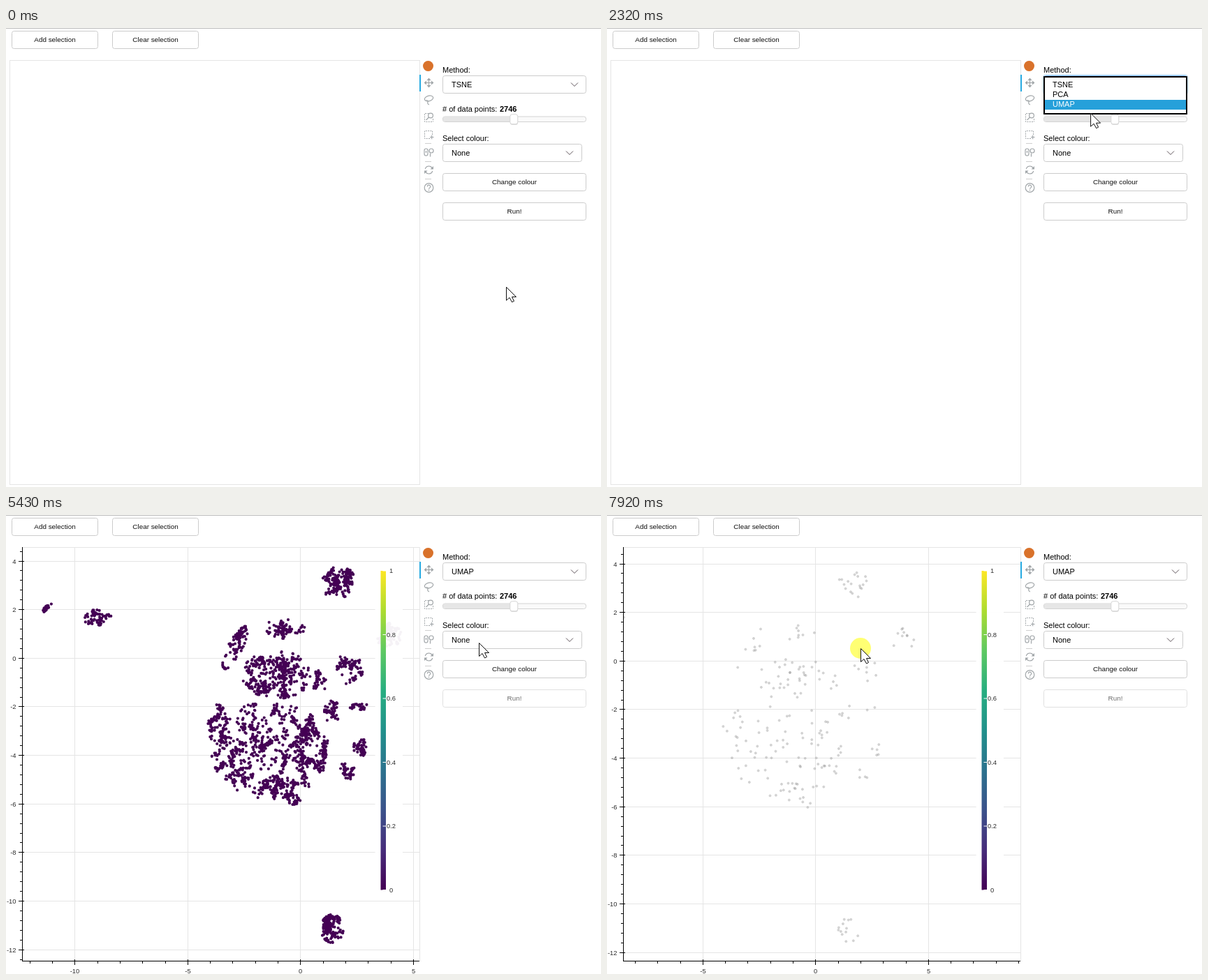
An HTML page for the animation above (8 s loop, 852 px wide and 658 px high).

```html
<!DOCTYPE html>
<html lang="en">
<head>
<meta charset="utf-8">
<title>Embedding explorer</title>
<style>
  html, body { margin: 0; width: 100%; height: 100%; overflow: hidden; background: #fff; }
  svg { display: block; width: 852px; height: 658px; font: 11px Arial, "Liberation Sans", sans-serif; fill: #000; }
  .btn rect, .box { fill: #fff; stroke: #ccc; }
  .btn text { font-size: 9.9px; text-anchor: middle; fill: #111; }
  .btn.hover rect { fill: #f5f5f5; stroke: #b8b8b8; }
  .btn.off { opacity: .6; }
  .chev { fill: none; stroke: #4a3e46; stroke-width: .9; }
  .caret { fill: #dcdcdc; }
  .icon { fill: none; stroke: #a1a6a9; stroke-width: 1.2; }
  .icon .solid { fill: #a1a6a9; stroke: none; }
  .icon .dash { stroke-dasharray: 2 1.3; stroke-width: 1; }
  .sep { stroke: #cfcfcf; }
  .grid { stroke: #e5e5e5; fill: none; }
  .axis { stroke: #000; fill: none; }
  .tick text, .scale text { font-size: 9.4px; fill: #2b2b2b; }
  .lod circle { fill: #808080; stroke: #808080; opacity: .35; }
</style>
</head>
<body>
<svg viewBox="0 0 852 658">
  <defs>
    <clipPath id="frame"><rect x="23" y="46" width="569" height="593"/></clipPath>
    <clipPath id="xBand"><rect x="23" y="636" width="570" height="22"/></clipPath>
    <clipPath id="yBand"><rect x="0" y="46" width="27" height="593"/></clipPath>
    <clipPath id="listClip"><rect x="627" y="71" width="202" height="34"/></clipPath>
    <linearGradient id="viridis" x1="0" y1="1" x2="0" y2="0"></linearGradient>
  </defs>

  <path d="M0 .5H852" stroke="#bdbdbd"/>
  <rect id="blank" class="grid" x="5.5" y="46.5" width="587" height="608"/>

  <g id="plot">
    <g clip-path="url(#frame)">
      <g id="pan">
        <path id="grid" class="grid"/>
        <path id="dots" stroke="#440154" stroke-width="4.2" stroke-linecap="round"/>
        <g id="lod" class="lod"></g>
      </g>
    </g>
    <path class="grid" d="M23 46.5H592.5V639"/>
    <path class="axis" d="M23.5 46V639.5M23 639.5H592"/>
    <g clip-path="url(#xBand)"><g id="xTicks" class="tick" text-anchor="middle"></g></g>
    <g clip-path="url(#yBand)"><g id="yTicks" class="tick" text-anchor="end"></g></g>
    <g id="scale" class="scale" text-anchor="middle">
      <rect x="528.5" y="71.5" width="39.5" height="475" fill="#fff" opacity=".95"/>
      <rect x="536.5" y="80" width="7.5" height="457.5" fill="url(#viridis)"/>
    </g>
  </g>

  <circle cx="604.5" cy="54.5" r="7.5" fill="#d9722b"/>
  <rect x="592" y="67" width="2" height="24" fill="#26aae1"/>
  <g class="icon">
    <path d="M600 78.5H611M605.5 73V84"/>
    <path class="solid" d="M605.5 71.5l3 3.5h-6zM605.5 85.5l3-3.5h-6zM598.5 78.5l3.5-3v6zM612.5 78.5l-3.5-3v6z"/>
    <ellipse cx="605.5" cy="101" rx="6.3" ry="3.8" transform="rotate(-15 605.5 101)"/>
    <path d="M601 104q4-1 3 2t2 4"/>
    <path class="dash" d="M610 134.5H599.5V122.5H605M611.5 130V134.5"/>
    <circle cx="608" cy="125.5" r="3.4"/>
    <path d="M605.5 128l-4 4"/>
    <path class="dash" d="M607 158.5H599.5V147.5H610.5V153"/>
    <path d="M607 156.5h5.5M609.7 153.7v5.6"/>
    <rect x="599" y="173" width="5" height="10" rx="2.5"/>
    <path d="M601.5 176v3M607.5 179.5v5"/>
    <circle cx="609" cy="176" r="3"/>
    <path d="M600.3 202a5.3 5.3 0 0 1 9.9-1M610.7 205a5.3 5.3 0 0 1-9.9 1"/>
    <path class="solid" d="M612 198v4.5h-4.5zM599 209v-4.5h4.5z"/>
    <circle cx="605.5" cy="229" r="6.3"/>
    <path d="M603.3 227.5a2.2 2.2 0 1 1 3.3 1.7q-1.1.6-1.1 1.6M605.5 231.7v1.5"/>
  </g>
  <path class="sep" d="M600 165.5h9M600 216.5h9"/>
  <path id="midSep" class="sep" d="M600 191.5h9"/>

  <text x="625" y="64">Method:</text>
  <rect id="glow" x="624" y="67" width="208" height="28" rx="5" fill="none" stroke="#66afe9" stroke-width="2" opacity=".25"/>
  <rect id="methodBox" class="box" x="625.5" y="68.5" width="205" height="25" rx="3"/>
  <rect id="caretA" class="caret" x="807" y="69" width="14" height="24"/>
  <path class="chev" d="M809 78.5l5 5 5-5"/>
  <text id="method" x="638" y="85"></text>

  <text x="625" y="120"># of data points:</text>
  <text x="707" y="120" font-weight="bold">2746</text>
  <rect x="625.5" y="127" width="205" height="7.5" rx="3" fill="#fafafa" stroke="#d3d3d3"/>
  <rect x="626" y="127.5" width="100" height="6.5" rx="2.5" fill="#e6e6e6"/>
  <rect x="722" y="125" width="11" height="14" rx="3" fill="#ddd"/>
  <rect x="721.8" y="123.8" width="11" height="14" rx="3" fill="#fff" stroke="#d5d5d5"/>

  <text x="625" y="162">Select colour:</text>
  <rect class="box" x="625.5" y="166.5" width="199" height="25" rx="3"/>
  <rect id="caretB" class="caret" x="800" y="167" width="14" height="24"/>
  <path class="chev" d="M802 176.5l5 5 5-5"/>
  <text x="638" y="183">None</text>
  <g id="buttons"></g>

  <g id="list">
    <rect id="listBox" x="626" y="70" width="204" height="36" fill="#fff" stroke="#000" stroke-width="2"/>
    <g clip-path="url(#listClip)">
      <rect id="mark" x="627" width="203" height="14" fill="#26a0da"/>
      <g id="rows"></g>
    </g>
  </g>

  <g id="cursor">
    <circle id="press" r="15" fill="#ff0" opacity=".55"/>
    <path d="M.5.5V19.500L5 15.500L8.500 22L11.500 20.500L8.500 14.500H14.500Z" fill="#fff" stroke="#111"/>
  </g>
</svg>

<script>
const LOOP = 8000;
const $ = id => document.getElementById(id);
const show = (id, on) => $(id).style.display = on ? '' : 'none';
const within = (t, a, b) => t >= a && t < b;
const lerp = (a, b, k) => a + (b - a) * Math.min(1, Math.max(0, k));

function buildAxes() {
  const line = v => Math.round(v) + .5;
  let grid = '', xs = '', ys = '', xd = '', yd = '';
  for (let v = -15; v <= 15; v++) {
    const x = line(421.3 + v * 32.3), major = v % 5 === 0;
    xd += `M${x} ${major ? 637 : 639}V${major ? 645 : 643}`;
    if (!major) continue;
    grid += `M${x} 0V700`;
    xs += `<text x="${x}" y="656.5">${v}</text>`;
  }
  for (let i = -35; i <= 15; i++) {
    const y = line(204.8 - i * 13.93), major = i % 5 === 0;
    yd += `M${major ? 18 : 20} ${y}H${major ? 26 : 24}`;
    if (!major) continue;
    grid += `M-200 ${y}H900`;
    ys += `<text x="14.5" y="${y + 3}">${i / 5 * 2}</text>`;
  }
  $('grid').setAttribute('d', grid);
  $('xTicks').innerHTML = `<path class="axis" d="${xd}"/>` + xs;
  $('yTicks').innerHTML = `<path class="axis" d="${yd}"/>` + ys;
}

function buildScale() {
  const colours = ['#440154', '#472d7b', '#3b528b', '#2c728e', '#21918c',
    '#28ae80', '#5ec962', '#addc30', '#fde725'];
  $('viridis').innerHTML = colours.map((c, i) =>
    `<stop offset="${i / (colours.length - 1)}" stop-color="${c}"/>`).join('');
  let marks = '';
  for (let i = 0; i <= 5; i++) {
    const y = 537.5 - i * 91.5;
    marks += `<path d="M539.5 ${y}h4.5" stroke="#fff"/><text x="551.5" y="${y + 3}">${i / 5}</text>`;
  }
  $('scale').insertAdjacentHTML('beforeend', marks);
}

// Islands: centre x, y, radius x, y, count, optional tilt
const islands = [
  [476, 97, 24, 25, 190], [58, 133, 11, 2, 30, -.8], [130, 147, 21, 11, 65],
  [400, 161, 32, 16, 85], [328, 190, 34, 10, 85, -1.1], [388, 229, 50, 34, 400],
  [493, 219, 19, 24, 80], [448, 240, 10, 17, 40], [303, 300, 14, 28, 80],
  [378, 337, 84, 70, 950], [410, 406, 14, 9, 45], [467, 282, 11, 16, 55],
  [507, 275, 15, 4, 25], [507, 333, 9, 14, 50], [488, 367, 11, 13, 45],
  [548, 172, 19, 17, 110], [467, 593, 16, 20, 150]
];

function buildDots() {
  let seed = 2746;
  const rnd = () => (seed = (seed * 16807) % 2147483647) / 2147483647;
  const spread = r => (rnd() + rnd() + rnd() - 1.5) * r;
  const points = [];
  for (const [cx, cy, rx, ry, count, tilt = 0] of islands) {
    const cos = Math.cos(tilt), sin = Math.sin(tilt);
    // Each island is filled by small, stretched clumps
    for (let left = count; left > 0;) {
      const a = rnd() * 2 * Math.PI, r = Math.sqrt(rnd()) * .96;
      const u = r * Math.cos(a) * rx, v = r * Math.sin(a) * ry;
      const size = Math.min(left, 1 + Math.floor(rnd() ** 2 * 14));
      const dir = rnd() * Math.PI, long = 3 + size * .7;
      left -= size;
      for (let i = 0; i < size; i++) {
        const along = spread(i && long);
        let x = u + along * Math.cos(dir) + spread(4);
        let y = v + along * Math.sin(dir) + spread(4);
        const out = Math.max(1, Math.hypot(x / rx, y / ry));
        x /= out; y /= out;
        points.push([(cx + x * cos - y * sin).toFixed(1), (cy + x * sin + y * cos).toFixed(1)]);
      }
    }
  }
  $('dots').setAttribute('d', points.map(([x, y]) => `M${x} ${y}h0`).join(''));
  $('lod').innerHTML = points.filter((p, i) => i % 11 === 0).map(([x, y]) =>
    `<circle cx="${x}" cy="${y}" r="1.5"/>`).join('');
}

const buttons = [
  ['Add selection', 8.5, 4.5, 123], ['Clear selection', 152.5, 4.5, 123],
  ['Change colour', 625.5, 208.5, 205], ['Run!', 625.5, 250.5, 205]
];
const options = ['TSNE', 'PCA', 'UMAP'];

buildAxes();
buildScale();
buildDots();
$('buttons').innerHTML = buttons.map(([label, x, y, w]) =>
  `<g class="btn"><rect x="${x}" y="${y}" width="${w}" height="25" rx="3"/>` +
  `<text x="${x + w / 2}" y="${y + 15.5}">${label}</text></g>`).join('');
$('rows').innerHTML = options.map((o, i) =>
  `<text x="638" y="${85 + i * 14}">${o}</text>`).join('');

// Pointer moves: start, end, x, y; it rests in between
const moves = [
  [0, 0, 716, 371], [60, 540, 823, 77], [760, 1470, 689, 113], [1800, 2090, 695, 134],
  [2180, 2420, 690, 113], [3020, 3100, 680, 142], [3100, 3500, 721, 259],
  [4320, 4480, 677, 183], [5640, 5730, 682, 194], [5910, 6360, 280, 165],
  [6520, 6970, 640, 93], [6970, 7400, 486, 187], [7450, 7920, 363, 191]
];
const presses = [[680, 760], [2650, 2790], [4110, 4400], [7450, LOOP]];

function pointer(t) {
  const i = moves.findLastIndex(m => m[0] <= t);
  const [start, end, x, y] = moves[i];
  const [, , x0, y0] = moves[Math.max(0, i - 1)];
  const k = (t - start) / (end - start || 1);
  return [lerp(x0, x, k), lerp(y0, y, k)];
}

function drawList(t, y) {
  const sliding = t < 1640;
  const height = sliding ? 34 : 51;
  const marked = sliding ? 0 : y <= 124 ? 2 : -1;
  $('listBox').setAttribute('height', height + 2);
  document.querySelector('#listClip rect').setAttribute('height', height);
  show('mark', marked >= 0);
  $('mark').setAttribute('y', 75 + marked * 14);
  [...$('rows').children].forEach((el, i) => el.style.fill = i === marked ? '#fff' : '#000');
}

function drawPlot(t) {
  const ready = t >= 4950, drag = t >= 7450;
  show('blank', !ready);
  show('plot', ready);
  show('dots', !drag);
  show('lod', drag);
  const k = (t - 7450) / 470;
  const dx = Math.round(lerp(0, -123, k)), dy = Math.round(lerp(0, 4, k));
  $('pan').setAttribute('transform', `translate(${dx} ${dy})`);
  $('xTicks').setAttribute('transform', `translate(${dx} 0)`);
  $('yTicks').setAttribute('transform', `translate(0 ${dy})`);
}

function draw(t) {
  const [x, y] = pointer(t);
  const over = (l, top, w, h = 25) => x >= l && x <= l + w && y >= top && y <= top + h;
  $('cursor').setAttribute('transform', `translate(${x.toFixed(1)} ${y.toFixed(1)})`);
  show('press', presses.some(([a, b]) => within(t, a, b)));

  const open = within(t, 1470, 2790), focus = within(t, 760, 2870);
  show('list', open);
  show('glow', focus);
  $('methodBox').style.stroke = focus ? '#66afe9' : '';
  $('method').textContent = options[t < 2790 ? 0 : 2];
  if (open) drawList(t, y);

  show('caretA', over(625, 69, 206, 24.5));
  show('caretB', over(625, 167, 199, 24) && !within(t, 5430, 5650));
  $('midSep').style.stroke = within(t, 4480, 4950) || within(t, 6200, 7450) ? '#999' : '';
  [...$('buttons').children].forEach((el, i) => {
    const [label, l, top, w] = buttons[i], off = label === 'Run!' && t >= 4650;
    el.classList.toggle('off', off);
    el.classList.toggle('hover', !off && over(l, top, w));
  });
  drawPlot(t);
}

const start = performance.now();
function loop() {
  draw((performance.now() - start) % LOOP);
  requestAnimationFrame(loop);
}
loop();
</script>
</body>
</html>
```
